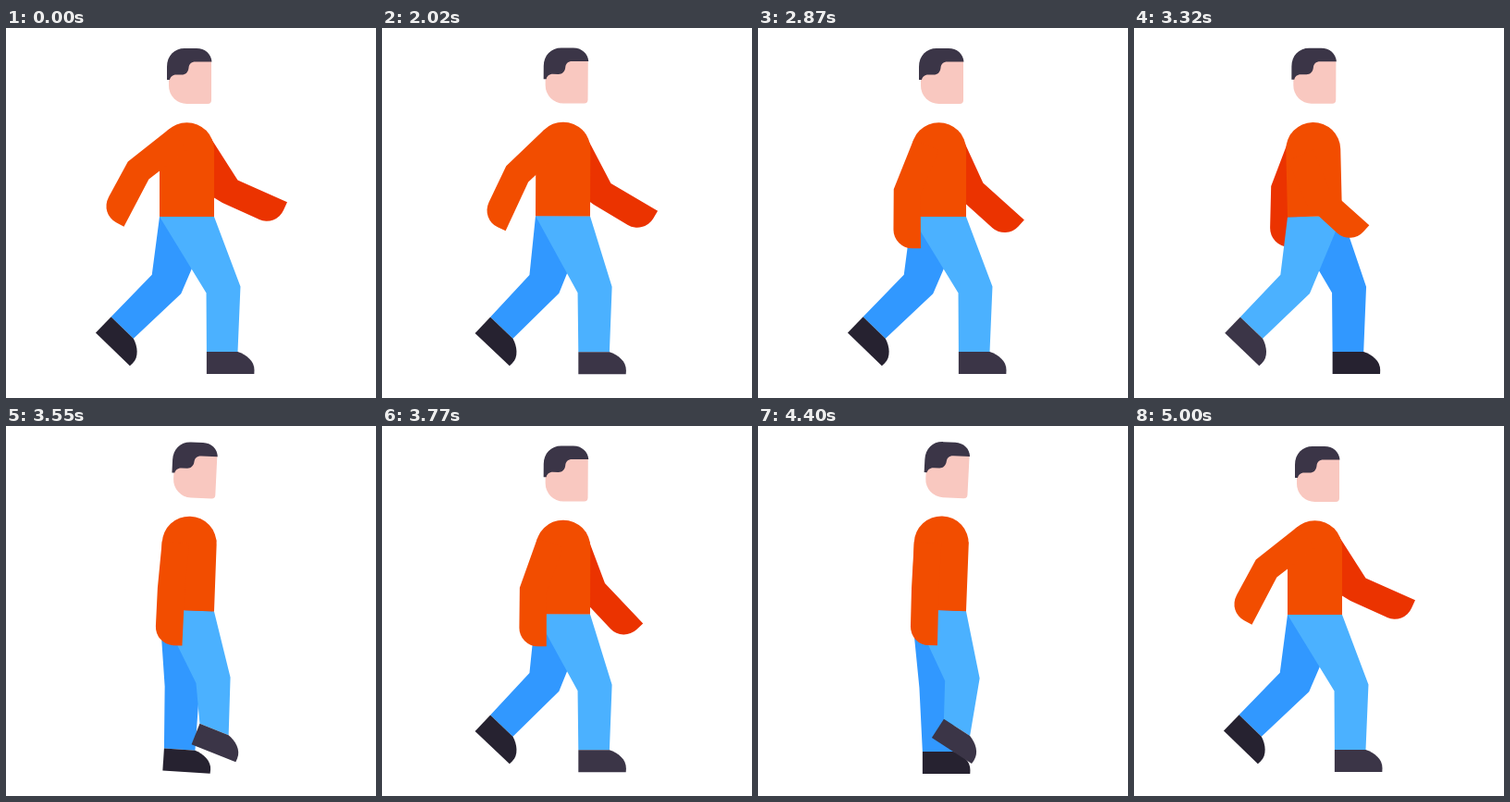
An HTML page with a canvas for the animation above (5020 ms loop, 400 by 400 pixels).

```html
<!DOCTYPE html>
<html lang="en">
<head>
<meta charset="utf-8">
<title>Walking man</title>
<style>
  html, body { margin: 0; width: 100%; height: 100%; overflow: hidden; background: #fff; }
  canvas { display: block; width: 400px; height: 400px; }
</style>
</head>
<body>
<canvas id="stage" width="400" height="400"></canvas>
<script>
const ctx = document.getElementById('stage').getContext('2d');
const LOOP = 5020, REST = 2020, STEP = 25; // ms
const STRIDE = 35, STRIDES = 3, LAST = 119; // counted in steps
const SETTLE = 23.75; // steps taken by the final slow quarter stride
const LIMB = 14.75;   // half width of an arm
const CHEST = 29.5;   // half width of the torso

const COLOR = {
  shirt: '#f24d00', sleeve: '#eb3300', near: '#4bb1ff', far: '#3198ff',
  shoe: '#3b3547', farShoe: '#262230', hair: '#3b3547', skin: '#f9c8c0'
};

// One stride runs plant, stand, push, swing, a quarter each.
const LEG = {
  plant: { kx: 235, ky: 283, ax: 233.7, ay: 350, tilt: 0 },
  stand: { kx: 192, ky: 283, ax: 193.5, ay: 352, tilt: 0 },
  push: { kx: 173.5, ky: 277, ax: 125.7, ay: 324, tilt: 44 },
  swing: { kx: 223, ky: 274, ax: 219, ay: 326, tilt: 32.5 }
};
const arm = (upper, fore, length) => ({ upper, fore, length });
const NEAR_ARM = {
  wide: arm(52, 28, 55), relaxed: arm(22, 0, 55),
  pass: arm(4, 3, 50), opposite: arm(-24, -51, 50)
};
const FAR_ARM = {
  wide: arm(-46, -66, 65), relaxed: arm(-39, -48, 59),
  pass: arm(-4, -8, 57), opposite: arm(38, 1, 54)
};

const rad = deg => deg * Math.PI / 180;
const lean = (x, y) => Math.atan2(-x, y) * 180 / Math.PI; // 0 points down

function mix(a, b, u) {
  const pose = {};
  for (const key in a) pose[key] = a[key] + (b[key] - a[key]) * u;
  return pose;
}

// rotate a local point and place it at an origin
function place([ox, oy], deg, x, y) {
  const c = Math.cos(rad(deg)), s = Math.sin(rad(deg));
  return [ox + x * c - y * s, oy + x * s + y * c];
}

function fill(color) {
  ctx.closePath();
  ctx.fillStyle = color;
  ctx.fill();
}

function inFrame([x, y], deg, paint) {
  ctx.save();
  ctx.translate(x, y);
  ctx.rotate(rad(deg));
  ctx.beginPath();
  paint();
  ctx.restore();
}

function quarter(phase) {
  const q = phase % 1 * 4;
  return [Math.floor(q), q % 1];
}

function legPose(phase) {
  const [i, u] = quarter(phase);
  const { plant, stand, push, swing } = LEG;
  if (i === 0) return mix(plant, stand, u);
  if (i === 1) return mix(stand, push, u);
  if (i === 2) return mix(push, swing, u ** 1.5);
  const pose = mix(swing, plant, u);
  const kick = Math.sin(Math.PI * u); // the foot reaches ahead, toe up
  pose.ax += 18 * kick;
  pose.tilt -= 30 * kick;
  return pose;
}

function armPose(poses, phase) {
  const [i, u] = quarter(phase);
  const atEnds = phase < .25 || phase > STRIDES - .25;
  const reach = atEnds ? poses.wide : poses.relaxed;
  const cycle = [reach, poses.pass, poses.opposite, poses.pass, reach];
  return mix(cycle[i], cycle[i + 1], u);
}

function bodyPose(phase) {
  const p = phase % 1;
  const rise = 1 - Math.abs(4 * (p % .5) - 1); // peaks as the feet pass
  const back = Math.max(0, 1 - Math.abs(4 * p - 2));
  return { tilt: 2.3 * rise - 1.6 * back, lift: 5 * rise, nod: 3 * rise };
}

function drawLeg(phase, pelvis, hips, color, shoe) {
  const { kx, ky, ax, ay, tilt } = legPose(phase);
  const knee = [kx, ky], ankle = [ax, ay];
  const thigh = lean(kx - pelvis[0], ky - pelvis[1]);
  const shin = lean(ax - kx, ay - ky);
  const bend = thigh + (shin - thigh) * .57;

  ctx.beginPath();
  [
    ...hips,
    place(knee, bend, 18.8, 0), place(ankle, tilt, 16.8, 0),
    place(ankle, tilt, -16.8, 0), place(knee, bend, -18.8, 0)
  ].forEach(p => ctx.lineTo(...p));
  fill(color);

  inFrame(ankle, tilt, () => {
    ctx.moveTo(-16.8, 0);
    ctx.lineTo(16.8, 0);
    ctx.bezierCurveTo(26, 3, 35, 10, 34.8, 20);
    ctx.lineTo(34.6, 24);
    ctx.lineTo(-16.8, 24);
    fill(shoe);
  });
}

// left and right are the edges of the sleeve at the shoulder
function drawArm(shoulder, { upper, fore, length }, left, right, color) {
  const elbow = place(shoulder, upper, (left + right) / 2, length);
  const bend = (upper + fore) / 2;
  const wrist = place(elbow, fore, -LIMB, 40);
  ctx.beginPath();
  ctx.moveTo(...place(shoulder, upper, left, 0));
  ctx.lineTo(...place(shoulder, upper, right, 0));
  ctx.lineTo(...place(elbow, bend, LIMB, 0));
  ctx.lineTo(...place(elbow, fore, LIMB, 61));
  ctx.arcTo(...place(elbow, fore, -LIMB, 61), ...wrist, 20);
  ctx.lineTo(...wrist);
  ctx.lineTo(...place(elbow, bend, -LIMB, 0));
  fill(color);
}

function drawTorso(pelvis, tilt) {
  inFrame(pelvis, tilt, () => {
    ctx.moveTo(-CHEST, 0);
    ctx.arc(0, -72.3, CHEST, Math.PI, 0);
    ctx.lineTo(CHEST, 0);
    fill(COLOR.shirt);
  });
}

function drawHead(center, tilt) {
  inFrame(center, tilt, () => {
    ctx.moveTo(-22, -4);
    ctx.lineTo(-8, -18);
    ctx.lineTo(24, -18);
    ctx.arcTo(24, 30, -2, 30, 4);
    ctx.arcTo(-22, 30, -22, 10, 19.5);
    fill(COLOR.skin);

    ctx.beginPath();
    ctx.moveTo(-24, 4);
    ctx.lineTo(-24, -10);
    ctx.bezierCurveTo(-24, -22, -16, -30, -5, -30);
    ctx.lineTo(8, -30);
    ctx.bezierCurveTo(17, -30, 24, -24, 24.5, -15.5);
    ctx.lineTo(7, -15.5);
    ctx.bezierCurveTo(2, -15.5, 0, -13, -.5, -9);
    ctx.bezierCurveTo(-1, -4, -4, -1.5, -8, -1.5);
    ctx.lineTo(-14, -1.5);
    ctx.bezierCurveTo(-18, -1.5, -20.5, 1, -21, 4);
    fill(COLOR.hair);
  });
}

// strides walked, slowing down over the last quarter
function phaseAt(ms) {
  if (ms < REST) return 0;
  const k = Math.min(LAST, Math.floor((ms - REST + 5) / STEP));
  const left = (LAST - k) / SETTLE;
  return left > 1 ? (k + 1) / STRIDE : STRIDES - .25 * left ** 2.9;
}

function draw(ms) {
  const phase = phaseAt(ms);
  const { tilt, lift, nod } = bodyPose(phase);
  const pelvis = [195.5, 204 - lift];
  const hips = [-CHEST, CHEST].map(x => place(pelvis, tilt, x, 0));
  const shoulder = place(pelvis, tilt, 0, -72.3);

  ctx.fillStyle = '#fff';
  ctx.fillRect(0, 0, 400, 400);
  drawArm(shoulder, armPose(FAR_ARM, phase), -CHEST, CHEST, COLOR.sleeve);
  drawLeg(phase + .5, pelvis, hips, COLOR.far, COLOR.farShoe);
  drawLeg(phase, pelvis, hips, COLOR.near, COLOR.shoe);
  drawTorso(pelvis, tilt);
  drawArm(shoulder, armPose(NEAR_ARM, phase), -CHEST, 0, COLOR.shirt);
  drawHead(place(pelvis, tilt, 2.5, -152), nod);
}

const start = performance.now();
function tick() {
  draw((performance.now() - start) % LOOP);
  requestAnimationFrame(tick);
}
tick();
</script>
</body>
</html>
```
